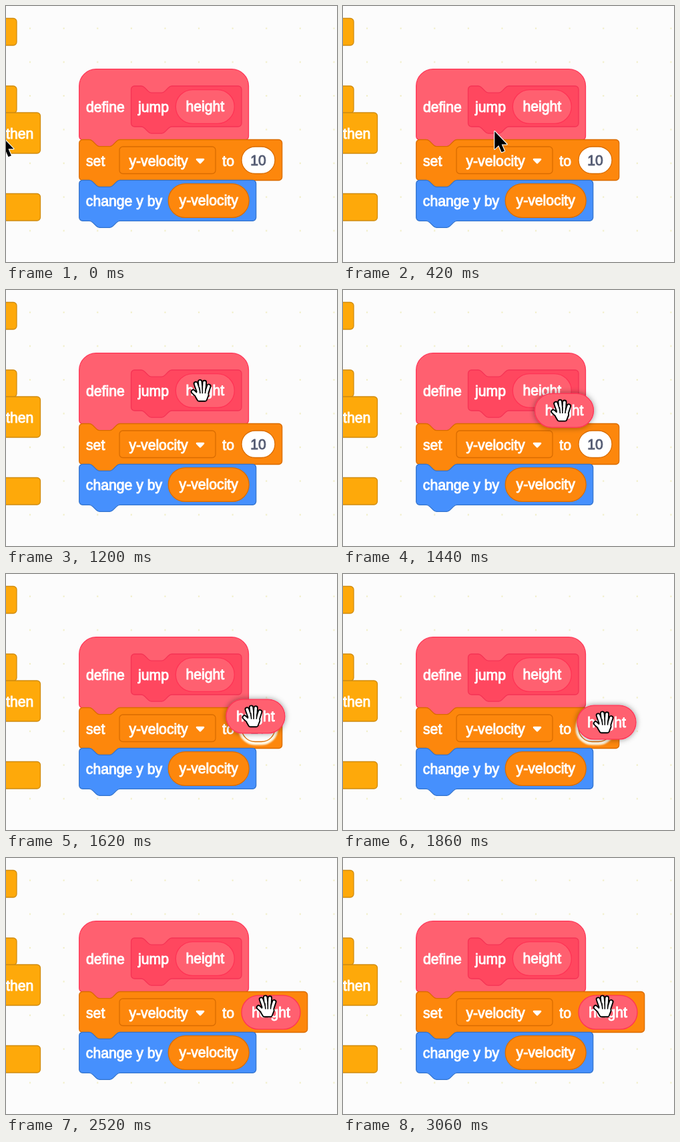
An HTML page that plays this animation: 496 by 384 pixels, repeating every 3.12 s.

```html
<!DOCTYPE html>
<html lang="en">
<head>
<meta charset="utf-8">
<title>Block drag</title>
<style>
  html, body { margin: 0; width: 100%; height: 100%; overflow: hidden; background: #fcfcfc; }
  svg { display: block; }
  text { font: 21.2px "Liberation Sans", Arial, sans-serif; fill: #fff; stroke: #fff; stroke-width: .95px; }
  .value { fill: #575e75; stroke: #575e75; }
</style>
</head>
<body>
<svg id="stage" width="496" height="384" viewBox="0 0 496 384">
  <defs>
    <pattern id="dots" x="10.3" y="8" width="50.6" height="50.6" patternUnits="userSpaceOnUse">
      <rect x="24.7" y="24.5" width="2" height="2" fill="#eeebbc"/>
    </pattern>
    <filter id="shadow" x="-30%" y="-40%" width="160%" height="180%">
      <feDropShadow dx="0" dy="0" stdDeviation="4" flood-color="#000" flood-opacity=".42"/>
    </filter>
    <filter id="glow" x="-30%" y="-40%" width="160%" height="180%">
      <feGaussianBlur stdDeviation="1.3"/>
    </filter>
  </defs>
  <rect width="496" height="384" fill="url(#dots)"/>
</svg>
<script>
const LOOP = 3120, STEP = 60, SCALE = 1.27;
const DRAG_START = 1200, DRAG_END_X = 1800, DRAG_END_Y = 1740, DROP = 2040;
const GRAB = { x: 293, y: 151 }, REST = { x: 391, y: 222.5 }, GRIP = 4;

const CORAL = ['#ff6070', '#ff3355'], PINK = ['#ff475f', '#f53355'];
const ORANGE = ['#fd870c', '#d96c00'], BLUE = ['#4690fd', '#3373cc'], GOLD = ['#fea90a', '#d08c10'];

const stage = document.getElementById('stage');

function add(tag, attrs, parent = stage, content = '') {
  const el = document.createElementNS('http://www.w3.org/2000/svg', tag);
  for (const key in attrs) el.setAttribute(key, attrs[key]);
  el.textContent = content;
  parent.append(el);
  return el;
}

const paint = ([fill, stroke]) => ({ fill, stroke, 'stroke-width': SCALE });
const show = (el, on) => el.setAttribute('visibility', on ? 'visible' : 'hidden');
const move = (el, x, y, scale = 1) => el.setAttribute('transform', `translate(${x} ${y}) scale(${scale})`);

function label(content, x, y, attrs = {}, parent = stage) {
  return add('text', { x, y, ...attrs }, parent, content);
}

function roundRect(x, y, width, height, rx, colors, parent = stage) {
  return add('rect', { x, y, width, height, rx, ...paint(colors) }, parent);
}

// Connector outline; d is 1 left to right, -1 right to left.
const notch = d => `c${2 * d} 0 ${3 * d} 1 ${4 * d} 2 l${4 * d} 4 c${d} 1 ${2 * d} 2 ${4 * d} 2 h${12 * d}
  c${2 * d} 0 ${3 * d} -1 ${4 * d} -2 l${4 * d} -4 c${d} -1 ${2 * d} -2 ${4 * d} -2`;

function blockPath(width, height, hat = false) {
  const w = width / SCALE, h = height / SCALE, r = hat ? 20 : 4;
  return `M0 ${r} a${r} ${r} 0 0 1 ${r} ${-r} ${hat ? '' : `H12 ${notch(1)}`} H${w - r}
    a${r} ${r} 0 0 1 ${r} ${r} V${h - 4} a4 4 0 0 1 -4 4 H48 ${notch(-1)} H4 a4 4 0 0 1 -4 -4 Z`;
}

function block(x, y, width, height, colors, hat) {
  return add('path', {
    d: blockPath(width, height, hat), ...paint(colors), 'stroke-width': 1,
    transform: `translate(${x} ${y}) scale(${SCALE})`
  });
}

// Oval reporter centred on its own origin.
function reporter(content, x, y, width, colors, attrs = {}) {
  const g = add('g', { transform: `translate(${x} ${y})`, ...attrs });
  roundRect(-width / 2, -25.4, width, 50.8, 25.4, colors, g);
  label(content, 0, 7.2, { 'text-anchor': 'middle' }, g);
  return g;
}

// Blocks cut off by the left edge
roundRect(-40, 18.5, 56, 40.5, 5, GOLD);
roundRect(-40, 120, 56, 40.5, 5, GOLD);
roundRect(-40, 160, 91.5, 61, 5, GOLD);
roundRect(-40, 281.5, 91.5, 40.5, 5, GOLD);
label('then', 0, 198.5);

// Script
block(109.7, 94.7, 253.8, 106, CORAL, true);
label('define', 120, 158.5);
block(187.5, 120, 165.5, 61, PINK);
label('jump', 198, 158.5);
reporter('height', 298.3, 151, 88, CORAL);

const setBlock = block(109.7, 200.5, 304, 61, ORANGE);
label('set', 120, 239.5);
roundRect(170, 211, 144, 40.5, 5, ORANGE);
label('y-velocity', 184.4, 239.5);
add('path', { d: 'M286 230 H296 L291 235.3 Z', fill: '#fff', stroke: '#fff', 'stroke-width': 2.6, 'stroke-linejoin': 'round' });
label('to', 324.3, 239.5);

const slot = add('g', {});
const slotGlow = add('rect', {
  x: 351, y: 209, width: 54, height: 45, rx: 22,
  fill: '#fff', stroke: '#fffbe8', 'stroke-width': 5, filter: 'url(#glow)'
}, slot);
roundRect(353, 211, 50, 40.5, 20.2, ['#fff', ORANGE[1]], slot);
label('10', 378, 239.3, { class: 'value', 'text-anchor': 'middle' }, slot);

block(109.7, 261.3, 265, 61, BLUE);
label('change y by', 119.8, 300);
reporter('y-velocity', 303.7, 292, 121, ORANGE);

const placed = reporter('height', 397, 231.5, 88, CORAL);
const dragged = reporter('height', 0, 0, 88, CORAL, { filter: 'url(#shadow)' });

// Cursors
const arrow = add('g', {});
add('path', {
  d: 'M0 0 V29 L6.6 22.8 L11.4 34 L16.2 32 L11.4 21 H20 Z',
  fill: '#000', stroke: '#fff', 'stroke-width': 2.4, 'paint-order': 'stroke', 'stroke-linejoin': 'round'
}, arrow);

const hand = add('g', {});
const fingers = 'M-8.2 -10 L-4 2 M-2.2 -12.8 L-.6 2 M4.2 -12 L3.4 2 M10.4 -6.5 L7 4 M-12 1.5 L-5 8';
const palm = 'M-4.5 2 L7 2 L7.5 6 L5 12.5 H-3.5 L-6.5 7.5 Z';
for (const [color, width] of [['#000', 7.2], ['#fff', 3.6]]) {
  add('path', {
    d: fingers + palm, fill: color, stroke: color, 'stroke-width': width,
    'stroke-linecap': 'round', 'stroke-linejoin': 'round'
  }, hand);
}
add('path', { d: 'M-3 -5 L-2 4 M1.3 -5 V4 M6.2 -4 L5.2 4', stroke: '#000', 'stroke-width': 1.5, fill: 'none' }, hand);

const progress = (t, from, to) => Math.min(1, Math.max(0, (t - from) / (to - from)));
const easeInOut = p => p * p * (3 - 2 * p);
const mix = (a, b, p) => a + (b - a) * p;

function render(time) {
  const t = Math.floor((time % LOOP) / STEP) * STEP;

  const approach = (1 - Math.cos(Math.PI * progress(t, 0, 600))) / 2;
  move(arrow, -7 + 295 * approach, 195 - 44 * approach ** 8, .92);
  show(arrow, t < 600);

  const x = mix(GRAB.x, REST.x, easeInOut(progress(t, DRAG_START, DRAG_END_X)));
  const y = mix(GRAB.y, REST.y, easeInOut(progress(t, DRAG_START, DRAG_END_Y)));
  move(hand, x, y, 1.04);
  show(hand, t >= 600);

  const dropped = t >= DROP;
  move(dragged, x + GRIP, y);
  show(dragged, t > DRAG_START && !dropped);
  show(placed, dropped);
  show(slot, !dropped);
  show(slotGlow, !dropped && Math.hypot(x + GRIP - 397, y - 231.5) < 48);
  setBlock.setAttribute('d', blockPath(dropped ? 342 : 304, 61));
}

const start = performance.now();
function tick() {
  render(performance.now() - start);
  requestAnimationFrame(tick);
}
tick();
</script>
</body>
</html>
```
